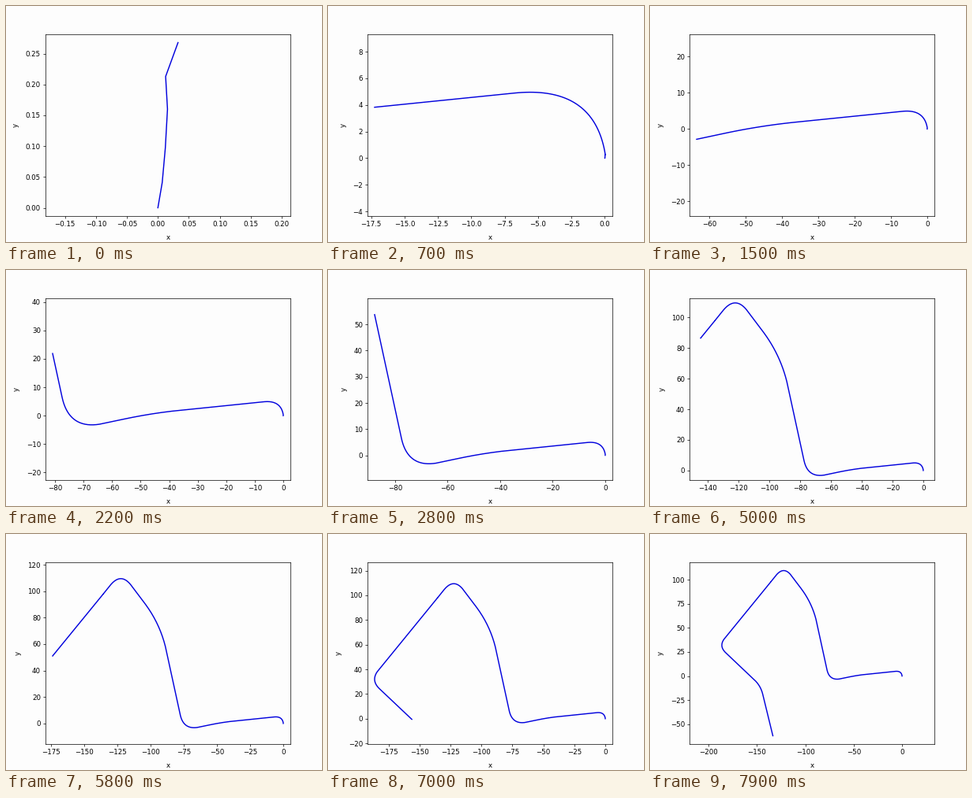
A matplotlib script for the animation above (8 s loop, 400 by 300 pixels).

```python
import numpy as np
import matplotlib.pyplot as plt
from matplotlib.animation import FuncAnimation

FRAMES, INTERVAL = 80, 100
BOX = 231 / 310  # height to width of the plot area
STEPS = 40       # steps along each rounded corner

# First wobbly steps near the origin.
WOBBLE = [(0, 0), (.007, .041), (.012, .097), (.0155, .16), (.0125, .213)]

# Corners of the route: x, y, rounding length, frame of passing.
ROUTE = np.array([
    (.0325, .268, 0, 0),
    (-.8, 5.5, 6, 4),
    (-46, .9, 10, 11.3),
    (-75, -5.3, 12, 17),
    (-92.3, 74.8, 20, 31.7),
    (-122.1, 114.6, 13, 39.3),
    (-135.5, 97.9, 0, 46.5),
    (-189.7, 31.3, 10.3, 62),
    (-146.1, -10.1, 9, 72.1),
    (-133.5, -62, 0, 79),
])
corners, reach, passing = ROUTE[:, :2], ROUTE[:, 2], ROUTE[:, 3]


def toward(p, q, length):
    d = q - p
    return p + d * min(1, length / np.hypot(*d))


def rounded(before, p, after, r):
    """Quadratic curve that cuts the corner p."""
    a, b = toward(p, before, r), toward(p, after, r)
    t = np.linspace(0, 1, STEPS + 1)[:, None]
    return (1 - t) ** 2 * a + 2 * t * (1 - t) * p + t * t * b


bends = [rounded(*corners[i - 1:i + 2], reach[i])
         for i in range(1, len(corners) - 1)]
route = np.vstack([corners[:1], *bends, corners[-1:]])
arc = np.r_[0, np.cumsum(np.hypot(*np.diff(route, axis=0).T))]

# Distance travelled when the middle of each corner is passed.
middles = 1 + STEPS // 2 + (STEPS + 1) * np.arange(len(bends))
passed = arc[np.r_[0, middles, len(arc) - 1]]
speed = np.gradient(passed, passing)


def travelled(frame):
    """Distance along the route, with smooth changes of speed."""
    k = min(np.searchsorted(passing, frame, side="right"), len(passing) - 1)
    h = passing[k] - passing[k - 1]
    u = (frame - passing[k - 1]) / h
    return (passed[k - 1] + u * u * (3 - 2 * u) * (passed[k] - passed[k - 1])
            + h * u * (1 - u) * ((1 - u) * speed[k - 1] - u * speed[k]))


def track(frame):
    s = travelled(frame)
    head = [np.interp(s, arc, route[:, i]) for i in (0, 1)]
    return np.vstack([WOBBLE, route[arc < s], head]).T


def view_width(w, h):
    """Width of the equal-scale view for data of width w and height h."""
    h = h / BOX
    if w >= h:
        return w * 310 / 292
    return 1.1 * (w if 1.1 * w > 1.05 * h else h)


fig, ax = plt.subplots(figsize=(6.4, 4.8), dpi=62.5, facecolor="#fdfdfd")
ax.set_facecolor("#fdfdfd")
ax.set_xlabel("x", labelpad=9)
ax.set_ylabel("y", labelpad=9)
line, = ax.plot([], [], color="#0000dd", lw=1.65)


def update(frame):
    x, y = track(frame)
    line.set_data(x, y)
    half = view_width(np.ptp(x), np.ptp(y)) / 2
    cx, cy = (x.min() + x.max()) / 2, (y.min() + y.max()) / 2
    ax.set_xlim(cx - half, cx + half)
    ax.set_ylim(cy - half * BOX, cy + half * BOX)
    return line,


anim = FuncAnimation(fig, update, frames=FRAMES, interval=INTERVAL,
                     init_func=lambda: update(0), repeat=True, repeat_delay=0)
plt.show()
```
